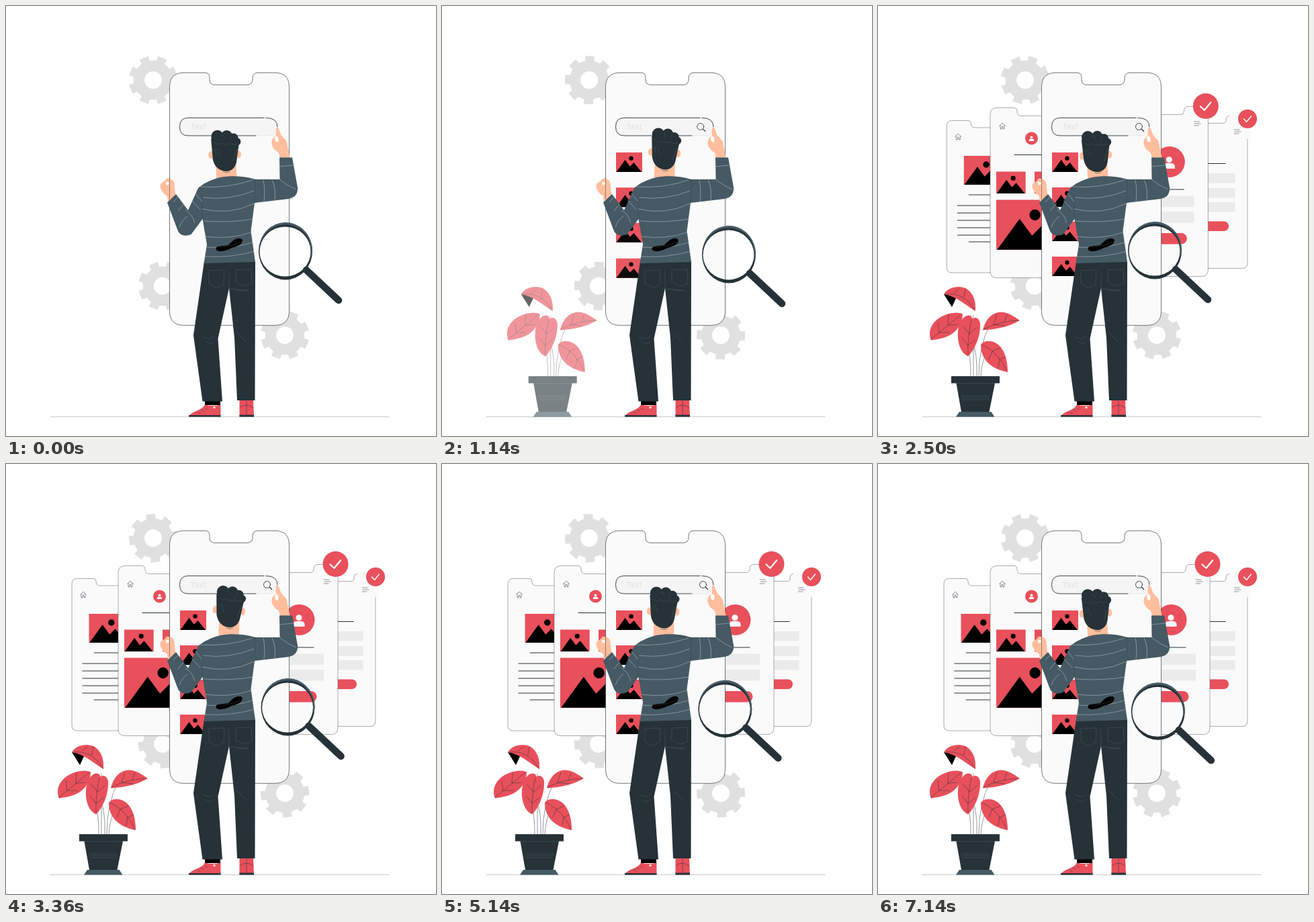
An HTML page for the animation above (7210 ms loop, 640 by 640 pixels).

```html
<!DOCTYPE html>
<html lang="en">
<head>
<meta charset="utf-8">
<title>Mobile search</title>
<style>
  html, body { margin: 0; width: 100%; height: 100%; overflow: hidden; background: #fff; }
  svg { display: block; width: 100%; height: 100%; }
  .red { fill: #e8505b; }
  .dark { fill: #263238; }
  .slate { fill: #455a64; }
  .skin { fill: #ffbe9d; }
  .grey { fill: #e0e0e0; }
  .field { fill: #ebebeb; }
  .screen { fill: #fafafa; stroke: #263238; stroke-width: .4; }
  .line { fill: none; stroke: #263238; stroke-width: .5; stroke-linecap: round; }
  .rule { fill: none; stroke: #263238; stroke-width: 1.1; stroke-linecap: round; }
  .faint { fill: none; stroke: #455a64; stroke-width: .7; }
  .stripe { fill: none; stroke: #d5dadd; stroke-width: .45; }
  .tick { fill: none; stroke: #fff; stroke-linecap: round; stroke-linejoin: round; }
  text { font: 11px Inter, "Open Sans", sans-serif; fill: #e0e0e0; }
</style>
</head>
<body>
<svg viewBox="0 0 640 640">
  <defs>
    <g id="picture">
      <path class="red" d="M0 0h39v29H0z"/>
      <path d="M.5 29L13.600 11l7.200 9.800L26.500 15l11.500 14z"/>
      <circle cx="22.500" cy="8.800" r="3.200"/>
    </g>
    <g id="person" fill="#fff">
      <circle cy="-3.600" r="4.300"/>
      <path d="M-8 9v-3q0-4 4.500-4.500h7Q8 2 8 6v3z"/>
    </g>
    <path id="house" class="line" d="M-4.500 0L0-4.500 4.500 0M-3 -1v5.500h2V1h2v3.500h2V-1"/>
    <path id="menu" class="line" d="M-5-3h8M-4 0h9M-5 3h7"/>
  </defs>

  <path class="line" d="M66 611.300H570" opacity=".55"/>
  <g id="gears" class="grey" fill-rule="evenodd"></g>

  <g id="farLeft">
    <path class="screen" d="M106 170.500h24q4 0 4 4 0 6.500 6 6.500h70v216H106q-8 0-8-8V179q0-8.500 8-8.500z"/>
    <use href="#house" x="115" y="194.500"/>
    <use href="#picture" transform="translate(123.500 223) scale(1.480)"/>
    <path class="rule" d="M131 281h50M114 297h70M114 308h70M114 319h70M114 330h70M114 341h70M131 351h50"/>
  </g>
  <g id="nearLeft">
    <path class="screen" d="M177 151.500h25q5 0 5 5 0 7 6 7h80v241H177q-10 0-10-10V162q0-10.500 10-10.500z"/>
    <use href="#house" x="185" y="178.500"/>
    <circle class="red" cx="228.500" cy="197" r="9.500"/>
    <use href="#person" transform="translate(228.500 197) scale(.45)"/>
    <path class="rule" d="M203 221.500h55"/>
    <use href="#picture" transform="translate(176 246.500) scale(1.120)"/>
    <use href="#picture" transform="translate(233 246.500) scale(1.120)"/>
    <use href="#picture" transform="translate(176 288.500) scale(2.560)"/>
  </g>
  <g id="farRight">
    <path class="screen" d="M440 174.500h74q4 0 4-5 0-6 6-6h18q8 0 8 8v211q0 8-8 8H440z"/>
    <path d="M523 160h32v38h-7v-28h-25z" fill="#fafafa"/>
    <path class="rule" d="M476 234.500h41"/>
    <path class="field" d="M465 249h66.500v14.500H465zM465 271h66.500v14.500H465zM465 292h66.500v14.500H465z"/>
    <rect class="red" x="472" y="320.500" width="50" height="14.500" rx="7.250"/>
    <use href="#menu" x="535" y="187"/>
    <circle class="red" cx="550" cy="168" r="14"/>
    <path class="tick" stroke-width="1.400" d="M544.500 168l4 4.500 7-8.500"/>
  </g>
  <g id="nearRight">
    <path class="screen" d="M380 161.500h73q5 0 5-5 0-7 7-7h19q10 0 10 10v233q0 10-10 10H380z"/>
    <circle class="red" cx="436.500" cy="232" r="23"/>
    <use href="#person" transform="translate(436 232.500) scale(1.060)"/>
    <path class="rule" d="M405 273h53"/>
    <path class="field" d="M400 282.500h73v16.500H400zM400 306h73v16.500H400z"/>
    <rect class="red" x="400" y="338" width="62.500" height="16.500" rx="8.250"/>
    <use href="#menu" x="478" y="175"/>
    <circle class="red" cx="490.500" cy="149" r="19"/>
    <path class="tick" stroke-width="2.300" d="M482.500 149.500l6 5.500 9.500-11.500"/>
  </g>

  <path class="screen" style="stroke-width:.65" d="M265 99.300h31q7 0 7 7v3q0 8 8 8h48q8 0 8-8v-2q0-8 8-8h25q21.500 0 21.500 21.500v333q0 21.500-21.500 21.500H265q-21.500 0-21.500-21.500V120.800q0-21.500 21.500-21.500z"/>
  <rect x="258.500" y="166.500" width="145.500" height="26.500" rx="11.500" fill="#f5f5f5" stroke="#ddd" stroke-width=".6"/>
  <path class="line" style="stroke-width:.85" d="M384 166.500H271q-12.500 0-12.500 13.300T271 193h101M387 166.500q17 0 17 13.300"/>
  <text x="275" y="184">Text</text>
  <g id="pictures"></g>
  <g id="searchIcon">
    <circle class="line" style="stroke-width:.9" cx="388.500" cy="179.500" r="5"/>
    <path class="line" style="stroke-width:1.200" d="M392.300 183.300l3.300 3.200"/>
  </g>

  <g id="plant">
    <path class="line" d="M138 551q0-30-5-47M142 551v-90M147 551q1-32-6-52M150 551q0-45 16-76M153 551q1-22 11-42"/>
    <path class="dark" d="M109 551h72v10.500h-7L165.500 604H124l-7.500-42.500H109z"/>
    <path class="slate" d="M121 604h47.500l5 7.500H116z"/>
    <path class="faint" d="M116 561.800h58M124 580h42M125 583h41M125 586h40" opacity=".8"/>
    <path d="M98 429l20 2-8 17z"/>
    <g class="red">
      <path d="M98 429c6-11 24-14 34-8 10 7 14 18 13 33-15-9-28-22-47-25z"/>
      <path d="M79 497.500c-6-14 2-28 15-35 11-6 25-8 32-4 0 10-4 20-14 28-9 7-20 9-33 11z"/>
      <path d="M134 521.500c-12-6-16-21-15-36 1-14 8-25 16-25 4 0 5 3 6 5 5-4 10 0 11 7 1 16-6 37-18 49z"/>
      <path d="M156 482.500c4-17 14-26 26-27 12 0 21 7 29 12.500-14 8-30 13-55 14.500z"/>
      <path d="M153 504c5-7 17-7 26 0 10 9 14 24 14 41-20-4-40-15-40-41z"/>
    </g>
    <path class="line" d="M100 429q28-4 44 24M113 427l8-6M128 433l2-12M79 496l45-37M91 486l-2-15M91 486l15 0M104 475l1-15M104 475l14-1M134 519q-1-25 5-52M134 505l-9-11M134 505l11-8M136 488l-9-11M136 488l11-9M157 481q24-12 52-13M172 474l5-15M172 474l17 2M188 470l4-10M155 504q23 10 37 39M170 514l12-5M170 514l-5 12M181 526l9-4M181 526l-2 12"/>
  </g>

  <g id="man">
    <path d="M296 587h23v7h-23z"/>
    <path class="red" d="M296 593.500q12 3 23.500 0V611H272q2-5 13-9 8-3 11-8.500zM347.500 586h20.500l1 25h-21.500z"/>
    <path class="dark" d="M272 609h47.500v2.500H272zM347.500 608.500H369v3h-21.500z"/>
    <path class="line" d="M285 604l4 2M290 601l4 2M296 599l3 1M348 598q9-8 20 0M358 588v20"/>
    <circle cx="310" cy="597.500" r="1.800" fill="#ffe0c8"/>
    <path class="dark" d="M295 380h76l-.5 207H344l-4-93-8-74-16.500 75 6.500 93.500h-29.500L279 490z"/>
    <path class="faint" d="M302 394l23-1-1 21-10 6-12-7zM342 393l23-1 1 21-11 4-13-6zM332 395v26l28 2M293 492q10 6 18-1M296 499q10 7 14 0M345 487l12 13M343 423l19 1" opacity=".8"/>

    <g id="head">
      <path class="skin" d="M312 232h30l1.500 27H313z"/>
      <ellipse class="skin" cx="305" cy="222" rx="4" ry="5.500"/>
      <ellipse class="skin" cx="346" cy="221" rx="3.500" ry="5.500"/>
      <path class="dark" d="M304.500 198l3 31q4 17 21 17.500 13-2 14.500-17l4-31z"/>
      <g class="dark">
        <circle cx="314" cy="194.500" r="9.300"/><circle cx="328" cy="193.500" r="8.300"/>
        <circle cx="338" cy="196.500" r="6.800"/><circle cx="343" cy="202" r="5.800"/>
      </g>
      <path class="faint" d="M309 203q6 6 12 1 6 5 11 0 6 4 12 1M319 193q6-1 6 5M334 193q2 4-2 7M310 213l2 8M313 212l5 12M341 220l-3 11M344 212l-3 9" opacity=".7"/>
      <path class="line" d="M323 247q5 3 10 0"/>
    </g>

    <path class="skin" d="M408.500 227l-3-9c-6-3-11-10-10-17 1-4 4-7 6-8l.5-11c1-3 3-1 4 1l3.500 9 8 9 1.500 7 4 20z"/>
    <path d="M401 193q-3 7 2 10 4-1 2-8z" fill="#fff"/>
    <path class="skin" d="M241 292l-1-9c-7-4-11-11-10.500-17 2-4 7-4 9-9 5-1 11 1 12 7l2 20z"/>
    <path d="M238 262q5-1 5 3l-4 2z" fill="#fff"/>
    <path class="line" d="M243.500 255v32"/>

    <path class="slate" d="M286 271c6-6 20-13 33-16 16-3 36-2 52 3h36.500l-.5-32.500h19L434 270q1 14-13 17l-51 6-5.500 42 6.500 46-76.500 2 4.500-28-6.500-38-17 23q-17 6-21-9l-14.500-38.500L253 280l18 24z"/>
    <path class="line" d="M293 283l-1 33M371 258l-1 34M352 256l18 4" opacity=".6"/>
    <path class="stripe" d="M289 269q40 3 78-10M293 285q40 5 76-10M292 302q40 10 77-8M295 320q38 3 73-3M297 343q35 5 68-6M298 359q38 3 69-7M296 373q40 2 74-8M383 259q3 14 1 32M396 259q6 12 4 30M407 258q12 10 25 15M407 239l20-2M281 278l11 13M276 289l13 14M267 304q10 5 14 19M256 305l10-12M249 292l8-9M258 329q4-11 12-16"/>
    <path d="M313 363c-3-7 9-5 18-7 5-7 15-13 20-9 3 7-7 11-15 13-9 5-20 7-23 3z"/>
    <path class="stripe" d="M318 359q20-1 31-8" opacity=".35"/>
  </g>

  <g id="lens">
    <path d="M447 393l48 45" stroke="#263238" stroke-width="10.500" stroke-linecap="round"/>
    <path class="dark" fill-rule="evenodd" d="M376 365a40 42.500 0 1 0 80 0a40 42.500 0 1 0-80 0zM377.500 365.500a38 37 0 1 0 76 0a38 37 0 1 0-76 0z"/>
    <path class="slate" d="M380 346A40 42.500 0 0 1 455 374l-2-4A38 37 0 0 0 380 350z"/>
  </g>
</svg>
<script>
const LOOP = 7210;
const byId = id => document.getElementById(id);
const setMove = (el, x, y) => el.setAttribute('transform', `translate(${x} ${y})`);

// Gears: eight teeth around a round hole
const ring = [];
for (let i = 0; i < 8; i++) {
  for (const [radius, offset] of [[29.5, -13], [36.5, -11], [36.5, 11], [29.5, 13]]) {
    const a = (i * 45 + offset) * Math.PI / 180;
    ring.push(`${(radius * Math.sin(a)).toFixed(2)} ${(-radius * Math.cos(a)).toFixed(2)}`);
  }
}
const gearPath = `M${ring.join('L')}zM-13 0a13 13 0 1 0 26 0a13 13 0 1 0-26 0z`;
const gearSpots = [[219, 110.3], [233, 416.8], [415, 490]];
byId('gears').innerHTML = gearSpots.map(() => `<path d="${gearPath}"/>`).join('');
const gears = [...byId('gears').children];

byId('pictures').innerHTML = [218, 270, 321, 373]
  .map(y => `<g><use href="#picture" x="259" y="${y}"/></g>`).join('');
const pictures = [...byId('pictures').children];

// Each entrance: element, start time, starting shift, fade
const entrances = [
  ...pictures.map((el, i) => [el, [0, 130, 330, 390][i], 0, 50, true]),
  [byId('searchIcon'), 450, -50, 0, true],
  [byId('plant'), 820, 50, 0, true],
  [byId('nearLeft'), 1340, 80, 0],
  [byId('farRight'), 1350, -144, 0],
  [byId('farLeft'), 1670, 148, 0],
  [byId('nearRight'), 1670, -91, 0],
];
const remaining = (t, start) => (1 - Math.min(1, Math.max(0, (t - start) / 1200))) ** 3;

// Drift of the magnifier: time, x, y
const drift = [
  [0, 0, 0], [700, 3, 3], [1200, 11.2, 5], [1790, 3, 4], [2500, -4, -1], [3200, 2, -3],
  [3900, 8.5, -2.5], [4140, 7.5, -2.3], [4700, 4, -1.5], [5140, 5.3, -.3], [5550, 8, 1.5],
  [6290, 2, 3.2], [6800, 0, 4], [7210, 1, 3],
];
function slope(i, axis) {
  const a = drift[Math.max(0, i - 1)], b = drift[Math.min(drift.length - 1, i + 1)];
  return (b[axis] - a[axis]) / (b[0] - a[0]);
}
function driftAt(t, axis) {
  const i = Math.max(0, drift.findIndex(p => p[0] > t) - 1);
  const a = drift[i], b = drift[i + 1], span = b[0] - a[0], u = (t - a[0]) / span;
  return a[axis] * (1 + 2 * u) * (1 - u) ** 2 + b[axis] * u * u * (3 - 2 * u)
    + span * u * (1 - u) * (slope(i, axis) * (1 - u) - slope(i + 1, axis) * u);
}

function draw(now) {
  const t = now % LOOP;
  const spin = 22.5 + Math.min(1080, t * .179);
  gears.forEach((gear, i) =>
    gear.setAttribute('transform', `translate(${gearSpots[i]}) rotate(${spin})`));

  for (const [el, start, x, y, fade] of entrances) {
    const k = remaining(t, start);
    setMove(el, x * k, y * k);
    if (fade) el.setAttribute('opacity', 1 - k);
  }

  const sway = 2.2 + 3.3 * Math.cos((Math.min(t, 6580) - 1380) / 2100 * 2 * Math.PI);
  byId('head').setAttribute('transform', `rotate(${sway} 364 291)`);
  setMove(byId('lens'), driftAt(t, 1), driftAt(t, 2));
}

let origin;
function tick(now) {
  origin ??= now;
  draw(Math.max(0, now - origin));
  requestAnimationFrame(tick);
}
draw(0);
requestAnimationFrame(tick);
</script>
</body>
</html>
```
